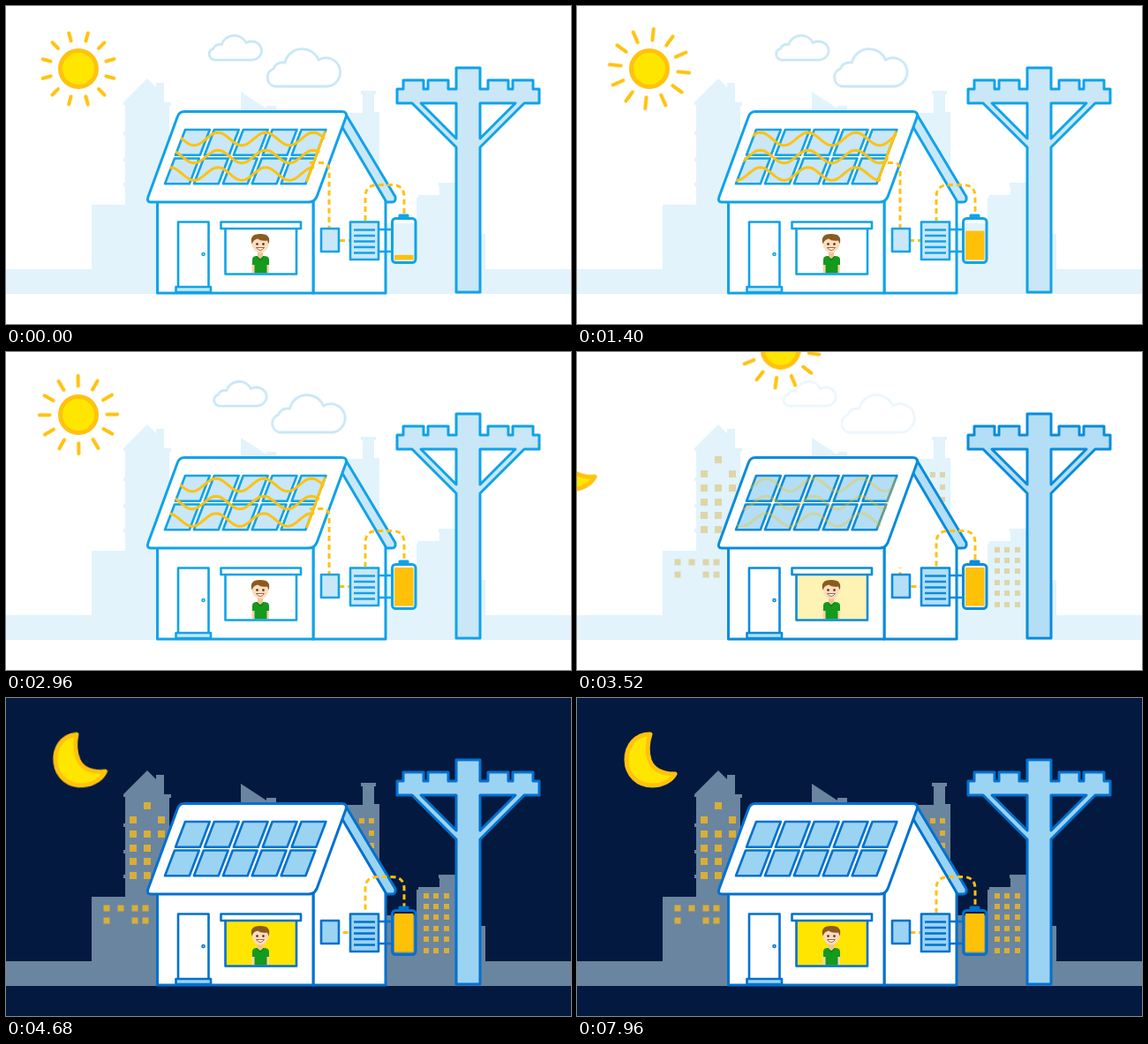
Animation of 640x360 px, one loop 8 s. Source, as an HTML page:

```html
<!DOCTYPE html>
<html lang="en">
<head>
<meta charset="utf-8">
<title>Solar home, day to night</title>
<style>
html, body { margin: 0; width: 100%; height: 100%; overflow: hidden; background: #fff; }
svg { display: block; width: 100vw; height: 100vh; }

/* shared 8 s timeline */
.sky, .line, .tint, .room, .lit, .fade, .wipe, .charge, .sun, .moon, .ray {
  animation: 8s linear infinite;
}
.line { stroke: #10a3e8; stroke-width: 3; stroke-linejoin: round; fill: none; }
.white { fill: #fff; }
.thin { stroke-width: 2.6; }
.amber { fill: none; stroke: #ffc20e; stroke-width: 3; stroke-linecap: round; }
.dash { stroke-linecap: butt; stroke-dasharray: 6 4; animation: march .5s linear infinite; }

.sky { animation-name: sky; }
.line { animation-name: line; }
.line.tint { animation-name: line, tint; }
.line.room { animation-name: line, room; }
.lit { animation-name: lit; fill: #d9ae38; }
.fade { animation-name: fade; }
.wipe { animation-name: wipe; stroke-dasharray: 100 100; }
.charge { animation-name: charge; transform-box: fill-box; transform-origin: 50% 100%; }
.sun { animation-name: sun; }
.ray { animation-name: ray; stroke-width: 4; }
.rays { animation: spin 2s linear infinite; }
.moon { animation-name: moon; }
.rock { transform-origin: 84px 71px; animation: rock 1s ease-in-out infinite alternate; }
.drift { animation: drift 4s linear infinite; }
.waves { animation: flow 1s linear infinite; }

@keyframes sky { 0%, 44.3% { fill: #fff; } 51.5%, 100% { fill: #04193f; } }
@keyframes line { 0%, 37% { stroke: #10a3e8; } 52%, 100% { stroke: #0071cf; } }
@keyframes tint { 0%, 37% { fill: #c9e7f7; } 52%, 100% { fill: #9bd3f2; } }
@keyframes room { 0%, 39% { fill: #fff; } 44% { fill: #fef2b4; } 52%, 100% { fill: #ffe500; } }
@keyframes lit { 0%, 38% { opacity: 0; } 44% { opacity: .42; } 52%, 100% { opacity: 1; } }
@keyframes fade { 0%, 37.5% { opacity: 1; } 44% { opacity: .36; } 48%, 100% { opacity: 0; } }
@keyframes wipe { 0%, 37.5% { stroke-dashoffset: 0; } 44.6%, 100% { stroke-dashoffset: -100; } }
@keyframes charge {
  0%, 3.5% { transform: scaleY(.13); animation-timing-function: ease-in-out; }
  25.6%, 100% { transform: none; }
}
@keyframes sun {
  0%, 37% { transform: none; animation-timing-function: ease-in; }
  44% { transform: translate(148px, -74px); }
  48%, 100% { transform: translate(310px, -150px); }
}
@keyframes ray {
  0% { stroke-dasharray: 9.3px 60px; animation-timing-function: ease-in-out; }
  11% { stroke-dasharray: 15.8px 60px; }
  17.5% { stroke-dasharray: 12.8px 60px; }
  29%, 100% { stroke-dasharray: 11.6px 60px; }
}
@keyframes spin { from { transform: rotate(15deg); } to { transform: rotate(45deg); } }
@keyframes moon {
  0%, 40% { transform: translate(-140px, 86px); animation-timing-function: ease-in-out; }
  44% { transform: translate(-92px, 57px); animation-timing-function: ease-out; }
  51.5%, 100% { transform: none; }
}
@keyframes rock { from { transform: none; } to { transform: rotate(-7.5deg); } }
@keyframes drift {
  0%, 100% { transform: none; animation-timing-function: ease-out; }
  25% { transform: translateX(-5.5px); animation-timing-function: ease-in-out; }
  75% { transform: translateX(5.5px); animation-timing-function: ease-in; }
}
@keyframes flow { from { transform: none; } to { transform: translateX(54px); } }
@keyframes march { from { stroke-dashoffset: 10; } to { stroke-dashoffset: 0; } }
</style>
</head>
<body>
<svg viewBox="0 0 640 360" preserveAspectRatio="none">
  <defs>
    <clipPath id="roofClip"><path d="M202 138H365L342 203H178Z"/></clipPath>
    <mask id="wireMask" maskUnits="userSpaceOnUse" x="330" y="160" width="60" height="100">
      <path class="wipe" pathLength="100" d="M344 177.5H358Q366 177.5 366 186V252" fill="none" stroke="#fff" stroke-width="8"/>
    </mask>
    <path id="cloud" d="M304 91A10.5 10.5 0 0 1 303 71Q306 63 316 64A20 20 0 0 1 354 61A16.2 16.2 0 1 1 364 91Z"
      fill="none" stroke="#c9e7f7" stroke-width="2.8" vector-effect="non-scaling-stroke"/>
  </defs>

  <rect class="sky" width="640" height="360" fill="#fff"/>

  <!-- skyline -->
  <g fill="#c8e8f8" opacity=".52">
    <path d="M0 298H97V225H135V204H133V200H135V176H133V172H135V146H133V142H135V112H133V109L160 82L170 92V87H179V109H187V113H185V225H266V97L295 116V113H306V120H385V121H404V100H402V96H419V100H417V120H423V246H465V217H467V214H491V204H490V200H510V258H543V298H640V326H0Z"/>
  </g>
  <g class="lit" id="lights"></g>

  <g class="fade"><g class="drift">
    <use href="#cloud"/>
    <use href="#cloud" transform="translate(17 1.9) scale(.72 .65)"/>
  </g></g>

  <g class="sun"><g transform="translate(82 71)">
    <g class="rays" id="rays"></g>
    <circle r="20.5" fill="#ffe600" stroke="#ffc20e" stroke-width="5"/>
  </g></g>

  <g class="moon"><path class="rock" fill="#ffe600" stroke="#ffc20e" stroke-width="5" stroke-linejoin="round"
    d="M83 41C66 41 56 54 56 70C56 87 69 99 85 99C98 99 107 93 111 86C97 86 86 81 82 70C79 60 80 50 83 41Z"/></g>

  <!-- utility pole -->
  <path class="line tint" fill-rule="evenodd" d="M510 70H537V94H546V84H569V94H574V84H597V94H604V110H587L537 160V324H510V160L460 110H443V94H450V84H473V94H478V84H501V94H510ZM470 110H510V150ZM537 110H577L537 150Z"/>

  <!-- house -->
  <path class="line white" d="M348 222L382 132L430 218V325H348Z"/>
  <rect class="line white" x="171.5" y="220" width="176.5" height="105"/>
  <path class="line tint" d="M384 121L441 216Q442 222 437 222H431L379 134Z"/>
  <path class="line white" d="M202 119.5H380Q387 119.5 385 126L352 216Q349 222 343 222H164Q159 222 161 216L194 126Q196 119.5 202 119.5Z"/>
  <g id="panels"></g>

  <rect class="line thin white" x="195" y="244.5" width="34.5" height="74"/>
  <rect class="line thin tint" x="192.5" y="318" width="39.5" height="6"/>
  <circle class="line" cx="223.5" cy="281" r=".8"/>

  <rect class="line thin room" x="248.5" y="250" width="80.5" height="53.5"/>
  <rect class="line thin white" x="243.5" y="244.5" width="90.5" height="7.5"/>

  <!-- resident -->
  <g>
    <path d="M278.500 302V291H298V302H294V295H282V302Z" fill="#f8d3ae"/>
    <path d="M285 277H291V286H285Z" fill="#f0c297"/>
    <path d="M279 293V287Q279 283 284 283L288 286L292 283Q298 283 298 287V293H295.500V302.300H281.500V293Z" fill="#149a1c"/>
    <path d="M284 283L288 288L292 283" fill="none" stroke="#0b7a14"/>
    <ellipse cx="288" cy="269.500" rx="9.300" ry="10" fill="#fbdcbc"/>
    <path d="M278.500 269.500Q275 258 288 258Q301 258 297.500 269.500L296 265.500Q289 266.500 285 263.500Q281 264.500 280 266.500Z" fill="#8a5a20"/>
    <circle cx="284.500" cy="269.500" r="1.300" fill="#3a2a1a"/>
    <circle cx="291.500" cy="269.500" r="1.300" fill="#3a2a1a"/>
    <path d="M283.500 273.500H292.500Q288 279.500 283.500 273.500Z" fill="#fff" stroke="#a0522d" stroke-width=".9"/>
  </g>

  <!-- power flow -->
  <g class="fade">
    <g clip-path="url(#roofClip)"><g class="waves"><path class="amber" id="waves"/></g></g>
    <path class="amber" d="M361 143L341 198"/>
  </g>
  <g mask="url(#wireMask)"><path class="amber dash" d="M344 177.5H358Q366 177.5 366 186V252"/></g>
  <path class="amber dash" d="M378 265.5H390"/>
  <path class="amber dash" d="M407 243V216Q407 202.5 421 202.5H437Q451 202.5 451 216V236"/>

  <rect class="line thin tint" x="357" y="252" width="20" height="26"/>
  <path class="line thin" d="M422 253H437M422 278H437"/>
  <rect class="line thin tint" x="390" y="244.5" width="32" height="42.5"/>
  <path class="line thin" d="M394 253.5H418M394 260H418M394 266.5H418M394 273H418M394 279.5H418"/>

  <rect class="line tint" x="446" y="237" width="9" height="3"/>
  <rect class="line" x="437.5" y="240.5" width="26.500" height="50" rx="4"/>
  <rect class="charge" x="440" y="244" width="21.500" height="43.500" fill="#ffc107"/>
</svg>

<script>
const put = (id, html) => { document.getElementById(id).innerHTML = html; };
const times = (n, fn) => Array.from({ length: n }, (_, i) => fn(i)).join('');

put('rays', times(12, i =>
  `<path class="amber ray" d="M0 -32.5V-60" transform="rotate(${i * 30})"/>`));

put('panels', times(10, i => {
  const row = Math.floor(i / 5), x = 203 + (i % 5) * 32.9 - row * 12, y = 140 + row * 32.5;
  return `<path class="line tint thin" d="M${x} ${y}h27.8l-11 28.8h-27.8z"/>`;
}));

// each row: centre y, window size, centre x values
const rows = [
  [122, 8, 160], [138, 8, 144, 176], [154, 8, 144, 160, 176],
  [170, 8, 144, 160], [185, 8, 144, 160], [201, 8, 144, 160],
  [238, 7, 114, 130, 146, 158], [252, 7, 114, 146, 158],
  [139, 6, 403, 414], [153, 6, 414], [167, 6, 414],
  ...[224, 236, 248, 261, 273, 286].map(y => [y, 6, 476, 487, 499])
];
put('lights', rows.map(([y, s, ...xs]) => xs.map(x =>
  `<rect x="${x - s / 2}" y="${y - s / 2}" width="${s}" height="${s}"/>`).join('')).join(''));

// sine rows, crest at x = 240, wavelength 54
const wave = cy => 'M' + Array.from({ length: 140 }, (_, i) => {
  const x = 110 + i * 2;
  return `${x} ${(cy - 7.3 * Math.cos((x - 240) * Math.PI / 27)).toFixed(2)}`;
}).join('L');
document.getElementById('waves').setAttribute('d', [150.5, 170.5, 190].map(wave).join(''));
</script>
</body>
</html>
```
